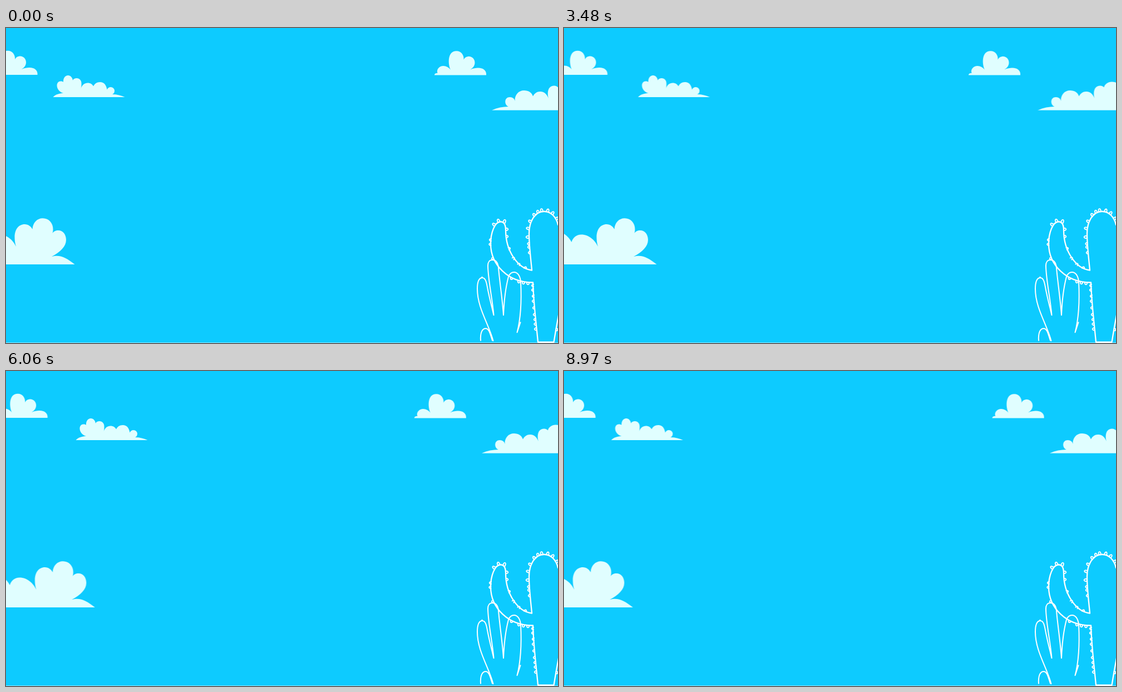
An HTML page that plays this animation: 992x565 px, repeating every 9000 ms.

```html
<!DOCTYPE html>
<html lang="en">
<head>
<meta charset="utf-8">
<title>Desert sky</title>
<style>
  html, body { margin: 0; width: 100%; height: 100%; overflow: hidden; background: #0dcbff; }
  svg { display: block; width: 992px; height: 565px; }
  .clouds { fill: #e0feff; }
  .lines { fill: none; stroke: #fff; stroke-linecap: round; stroke-linejoin: round; }
</style>
</head>
<body>
<svg viewBox="0 0 992 565">
  <defs>
    <path id="puff" d="M770 84.5C770 82 772 80.5 775.5 81C773 74 779 68 786 68C791 68 796 71 799 75
      C794 65 793 41.3 809.5 41.3C818 41.3 823.5 49 822.5 57C824 53 828 51 832 51C838 51 842.5 56 842.5 62
      C842.5 68 839 71.5 834.5 74.5C843 71 850 71 855 72.5C861 74.5 863.5 79 863 84.5Z"/>
  </defs>

  <g class="clouds">
    <g data-dx="27.8"><use href="#puff" x="-806.5" y="-0.6"/></g>
    <g data-dx="-55.5"><use href="#puff"/></g>
    <g data-dx="62.7">
      <path d="M84.5 124C89 119 96 117 103 117C96 115 91.5 109 91.5 103C91.5 98 95 95 98.5 95.5
        C101 95.5 102 96 103 97C102.5 90 106 85 111.5 85C116 85 119.5 89 120 94C121 91 124 90 127 90
        C132 90 135.5 94 135.5 99C135.5 103 135.5 106 134.5 108.5C137 102 141 98.5 147 98.5
        C151 98.5 155 100.5 157 104.5C159 100 163 97 169 97C176 97 180 102 181.5 110.5
        C183 107.5 185 106 188 106C192 106 195 109 195 112.5C195 115 194 117.5 191 119
        C200 119 207 121 213.5 124Z"/>
    </g>
    <g data-dx="-27.8">
      <path d="M873 147.5C883 143 893 141 903 141C895 138 895 124 905.5 124C910.5 124 914 127 914.5 131
        C914 120 921 112 931 112C939 112 945 116 947 122.5C950 117 954 114 960 114C968 114 973 120 975.5 128
        C972 118 973 103.5 985 103.5C988 103.5 990 104.5 992 106.5C993 101 999 96.5 1006 96.5
        C1014 96.5 1022 101 1023 110L1060 147.5Z"/>
    </g>
    <g data-dx="55.6">
      <path d="M-100 424V375C-90 360 -58 358 -43 369C-36 374 -32 379 -29.5 384C-27 376 -21 370.5 -12 370.5
        C2 370.5 13 381 18 392C16 386 15.5 380 15.5 375C15.5 361 23 352 33.5 352C40 352 45 356 47.5 361
        C48 349 56 341.2 66 341.2C77 341.2 84.5 350 84.5 361C84.5 364 84 366 83.5 368
        C86 364.5 89 363 94 363C102 363 108 370 108 380C108 392 97 402 82 410C97 406 107 411 123.5 424Z"/>
    </g>
  </g>

  <g class="lines" stroke-width="2">
    <path d="M875.5 561C868 532 847 502 847 468C847 455 850 448 856 448C863 448 864 460 866 470
      C869 485 873 500 876.5 515C874 485 866 450 866 426C866 420 869 416 874 416C880 416 884 420 885 430
      C887 455 892 485 894 515C895 490 898 465 903 446C905 441 908 438 913 438C919 438 924 444 925 455
      C927 495 924 525 918.5 546L924.5 528"/>
    <path d="M853 560.5C852 546 856 539 862 539C868 539 870 548 874 560.5M855.5 446.5V447.5"/>
  </g>
  <g class="lines" stroke-width="2.3">
    <path d="M992 353C989 339 979 329 967 329C951 329 940 346 940 369C940 392 943 412 945 434.5
      C920 432 898 400 898 363C898 353 895 347.5 889 347.5C878 347.5 871 368 871 387C871 425 903 457 947 456.5
      C948 495 953 530 956 563.5H984.5C987 548 990 531 993 515"/>
    <g id="spines" stroke-width="1.9"></g>
  </g>
  <rect y="564.5" width="992" height="1" fill="#fff"/>
</svg>

<script>
  // x, y on the outline, then outward direction in degrees
  const longSpines = [
    [879, 354, -145], [886, 348, -115], [895, 349, -70],
    [944, 348, -150], [940.5, 360, -165], [940, 375, 180], [951, 337, -135],
    [957, 332, -115], [963, 329.5, -100], [973, 330, -75], [981, 334, -55], [988, 343, -35]
  ];
  const shortSpines = [
    [872, 380, 180], [871.5, 388, 180], [899, 361, 0], [899, 374, 0], [903, 396, -20],
    [911, 414, -40], [921, 425, -50], [933, 431.5, -70], [876, 413, 160], [909, 448, 115],
    [922, 454, 105], [930, 456, 95], [938, 457, 90],
    [940.5, 387, 180], [941, 393, 180], [942, 403, 180],
    [948, 462, 180], [948, 470, 180], [949, 481, 180], [949, 490, 180], [950, 502, 180],
    [951, 514, 180], [952, 523, 180], [952.5, 531, 180], [953, 540, 180], [988.5, 541, 0]
  ];

  function addSpines(list, shape) {
    for (const [x, y, angle] of list) {
      const path = document.createElementNS('http://www.w3.org/2000/svg', 'path');
      path.setAttribute('d', shape);
      path.setAttribute('transform', `translate(${x} ${y}) rotate(${angle})`);
      document.getElementById('spines').append(path);
    }
  }
  addSpines(longSpines, 'M0 -2.2L4 -1.7Q6.8 0 4 1.7L0 2.2');
  addSpines(shortSpines, 'M0 -2L2 -1.8Q4.6 0 2 1.8L0 2');

  // Each cloud drifts out and back at constant speed.
  for (const cloud of document.querySelectorAll('[data-dx]')) {
    cloud.animate(
      [{ transform: 'translateX(0)' }, { transform: `translateX(${cloud.dataset.dx}px)` }],
      { duration: 4500, iterations: Infinity, direction: 'alternate', easing: 'linear' }
    );
  }
</script>
</body>
</html>
```
